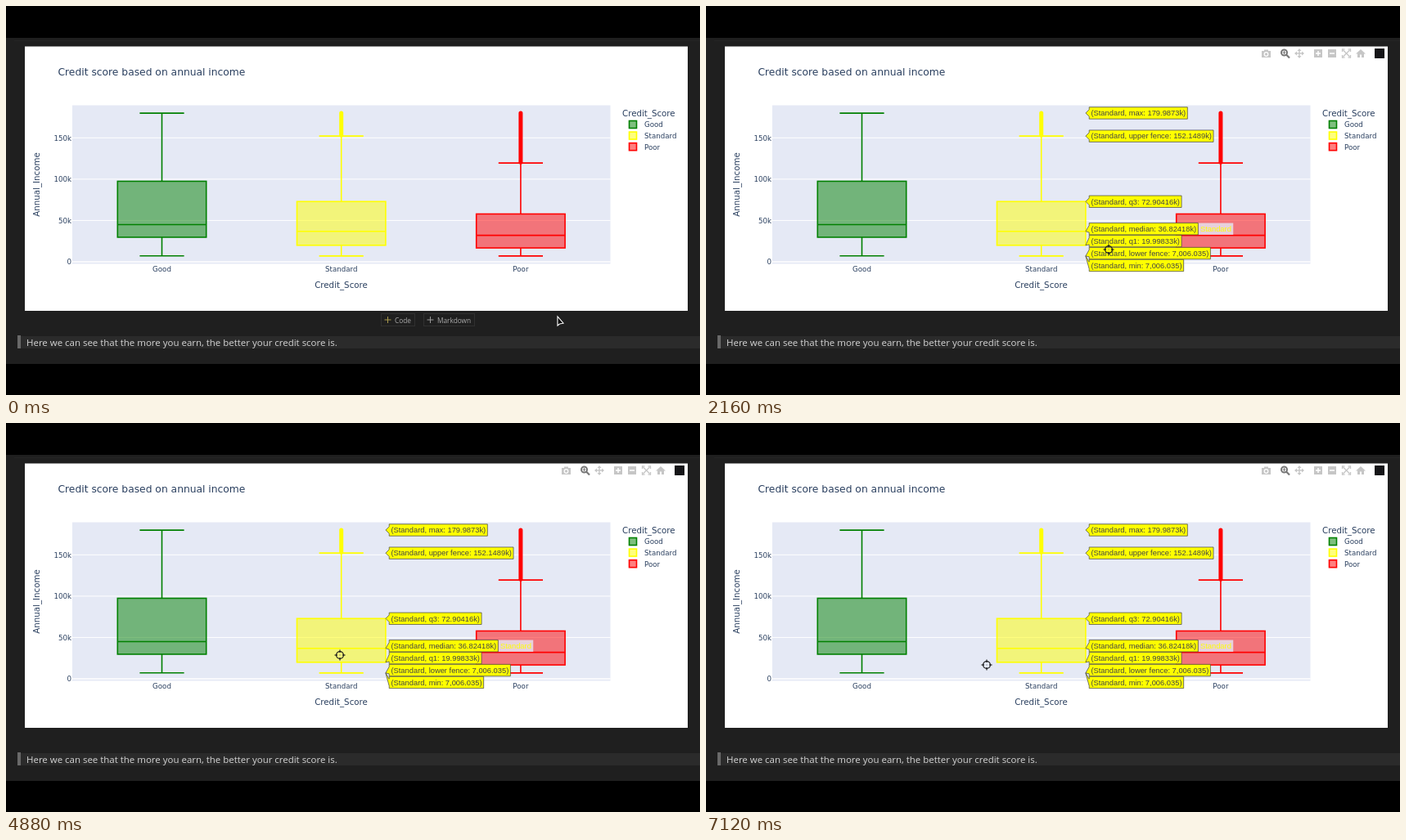
Write an HTML page with a canvas that moves like this. It is 848 by 476 pixels and loops after 7200 ms.

```html
<!DOCTYPE html>
<html lang="en">
<head>
<meta charset="utf-8">
<title>Credit score box plot</title>
<style>
  html, body { margin: 0; width: 100%; height: 100%; overflow: hidden; background: #000; }
  canvas { display: block; }
</style>
</head>
<body>
<canvas id="stage" width="848" height="476"></canvas>
<script>
const ctx = document.getElementById('stage').getContext('2d');
const LOOP = 7200, STEP = 80;
const INK = '#2a3f5f', PLOT = '#e5e9f5', ICON = '#c6c6c6';
const SANS = '"DejaVu Sans", sans-serif';
const UI = '"Open Sans", sans-serif';
const TITLE = '12.3px ' + SANS, AXIS = '10.25px ' + SANS, TICK = '8.68px ' + SANS;
const LABEL = '9.36px "Liberation Sans", sans-serif';

// Incomes in thousands, one per statistic
const STATS = ['max', 'upper fence', 'q3', 'median', 'q1', 'lower fence', 'min'];
const groups = [
  { name: 'Good', rgb: '0,128,0', contrast: '#fff',
    values: [179.8254, 179.8254, 97.45698, 44.92786, 29.70973, 7.18954, 7.18954] },
  { name: 'Standard', rgb: '255,255,0', contrast: '#444',
    values: [179.9873, 152.1489, 72.90416, 36.82418, 19.99833, 7.006035, 7.006035] },
  { name: 'Poor', rgb: '255,0,0', contrast: '#fff',
    values: [179.9873, 119.4912, 57.87795, 32.06486, 16.77091, 7.00593, 7.00593] },
];
groups.forEach((g, i) => {
  g.x = 190.5 + i * 219.2;
  g.line = `rgb(${g.rgb})`;
  g.fill = `rgba(${g.rgb},.5)`;
});

// Pointer stops: time, x, y
const path = [
  [0, 676, 385], [880, 636, 303], [2160, 492, 298], [3520, 200, 298], [3920, 200, 298],
  [4880, 408, 284], [5920, 632, 297], [6560, 526, 297], [7120, 343, 296], [LOOP, 325, 296],
];

const yOf = value => 313 - value * 1.0112;
const format = v => v < 10
  ? (v * 1000).toLocaleString('en', { maximumFractionDigits: 3 })
  : v + 'k';

function rect(x, y, w, h, color) {
  ctx.fillStyle = color;
  ctx.fillRect(x, y, w, h);
}

function frame(x, y, w, h, color, width) {
  ctx.strokeStyle = color;
  ctx.lineWidth = width;
  ctx.strokeRect(x, y, w, h);
}

function line(x1, y1, x2, y2, color, width) {
  ctx.strokeStyle = color;
  ctx.lineWidth = width;
  ctx.beginPath();
  ctx.moveTo(x1, y1);
  ctx.lineTo(x2, y2);
  ctx.stroke();
}

function plus(x, y, r, color, width) {
  line(x - r, y, x + r, y, color, width);
  line(x, y - r, x, y + r, color, width);
}

function ring(x, y, r, color, width) {
  ctx.strokeStyle = color;
  ctx.lineWidth = width;
  ctx.beginPath();
  ctx.arc(x, y, r, 0, 2 * Math.PI);
  ctx.stroke();
}

function polygon(points, color) {
  ctx.fillStyle = color;
  ctx.beginPath();
  points.forEach(p => ctx.lineTo(...p));
  ctx.closePath();
  ctx.fill();
}

function text(str, x, y, font, color, align = 'left') {
  ctx.font = font;
  ctx.fillStyle = color;
  ctx.textAlign = align;
  ctx.fillText(str, x, y);
}

// Draws the same part four times, a quarter turn apart
function fourWays(x, y, part) {
  for (let i = 0; i < 4; i++) {
    ctx.save();
    ctx.translate(x, y);
    ctx.rotate(i * Math.PI / 2);
    part();
    ctx.restore();
  }
}

function pointerAt(t) {
  const i = path.findIndex(p => p[0] > t);
  const [t0, x0, y0] = path[i - 1], [t1, x1, y1] = path[i];
  const k = (t - t0) / (t1 - t0);
  return { x: x0 + (x1 - x0) * k, y: y0 + (y1 - y0) * k };
}

// Pushes crowded positions apart, keeping the centre of each crowd
function spread(positions, gap) {
  const crowds = [];
  positions.forEach((y, i) => {
    const crowd = { sum: y - i * gap, n: 1 };
    while (crowds.length && crowds.at(-1).sum / crowds.at(-1).n > crowd.sum / crowd.n) {
      const previous = crowds.pop();
      crowd.sum += previous.sum;
      crowd.n += previous.n;
    }
    crowds.push(crowd);
  });
  return crowds.flatMap(c => Array(c.n).fill(c.sum / c.n)).map((y, i) => y + i * gap);
}

function drawNotebook() {
  rect(0, 0, 848, 476, '#000');
  rect(0, 39, 848, 399, '#1f1f1f');
  rect(10, 42, 838, 1, '#242424');
  rect(14, 404, 834, 15, '#2b2b2b');
  rect(14, 403, 4, 16, '#686868');
  text('Here we can see that the more you earn, the better your credit score is.',
       25, 416, '11.47px ' + UI, '#d4d4d4');
}

function drawCellButton(x, width, name, color) {
  frame(x + .5, 376.5, width, 15, '#303030', 1);
  plus(x + 8.5, 384, 4, color, 1);
  text(name, x + 17, 388, '8.3px ' + UI, '#aaa');
}

function drawBox({ x, line: color, fill, values }) {
  const [max, high, q3, median, q1, low] = values.map(yOf);
  const half = 54.2, cap = half / 2, width = 1.6;
  rect(x - half, q3, half * 2, q1 - q3, fill);
  frame(x - half, q3, half * 2, q1 - q3, color, width);
  line(x - half, median, x + half, median, color, width);
  for (const [edge, fence] of [[q3, high], [q1, low]]) {
    line(x, edge, x, fence, color, width);
    line(x - cap, fence, x + cap, fence, color, width);
  }
  if (max < high) {
    ctx.lineCap = 'round';
    line(x, max, x, high - 1, color, 5);
    ctx.lineCap = 'butt';
  }
}

function drawChart() {
  rect(23, 49.5, 810, 323.5, '#fff');
  rect(81, 121.5, 657.5, 194, PLOT);
  for (let v = 0; v <= 150; v += 50) {
    line(81, yOf(v), 738.5, yOf(v), '#fff', v ? 1 : 1.6);
    text(v ? v + 'k' : '0', 80, yOf(v) + 3.2, TICK, INK, 'right');
  }
  text('Credit score based on annual income', 63.5, 85, TITLE, INK);
  text('Credit_Score', 409.5, 344.5, AXIS, INK, 'center');
  text('Credit_Score', 753, 134.5, AXIS, INK);
  ctx.save();
  ctx.translate(41, 218.5);
  ctx.rotate(-Math.PI / 2);
  text('Annual_Income', 0, 0, AXIS, INK, 'center');
  ctx.restore();

  groups.forEach((g, i) => {
    const y = 145 + i * 13.6;
    drawBox(g);
    text(g.name, g.x, 325, TICK, INK, 'center');
    rect(761.5, y - 4.5, 9, 9, g.fill);
    frame(761.5, y - 4.5, 9, 9, g.line, 1.6);
    text(g.name, 780, y + 3.3, TICK, INK);
  });
}

function drawModebar() {
  const y = 58;
  // camera
  rect(679, y - 3, 11, 8, ICON);
  rect(682, y - 4.5, 5, 2, ICON);
  ring(684.5, y + 1, 2.3, '#fff', 1.2);
  // magnifier
  ring(706.5, y - 1, 3.5, '#777', 2);
  line(709, y + 1.5, 713, y + 5.5, '#777', 2.2);
  plus(706.5, y - 1, 2, '#777', 1);
  // pan
  plus(725, y, 5, ICON, 1.4);
  fourWays(725, y, () => polygon([[6, 0], [3, -2.5], [3, 2.5]], ICON));
  // zoom in, zoom out
  rect(743, y - 5, 10, 10, ICON);
  plus(748, y, 3, '#fff', 1.5);
  rect(760, y - 5, 10, 10, ICON);
  line(762, y, 768, y, '#fff', 1.5);
  // autoscale
  fourWays(782.5, y, () => {
    line(0, 0, 4, 4, ICON, 1.3);
    line(2, 5, 5.5, 5, ICON, 1.3);
    line(5, 2, 5, 5.5, ICON, 1.3);
  });
  // home
  polygon([[794, y + .5], [800, y - 5], [806, y + .5]], ICON);
  rect(796, y, 8, 5, ICON);
  rect(799, y + 1.5, 2, 3.5, '#fff');
  rect(817, y - 6, 12, 12, '#151518');
}

function drawHover({ name, x, line: color, contrast, values }) {
  const tip = x + 54.2, left = tip + 4.3, half = 7.2, notch = 4.3;
  const anchors = values.map(yOf);
  spread(anchors, 14.9).forEach((y, i) => {
    const label = `(${name}, ${STATS[i]}: ${format(values[i])})`;
    ctx.font = LABEL;
    const right = left + ctx.measureText(label).width + 4.3;
    if (STATS[i] === 'median') {
      rect(right, y - half, ctx.measureText(name).width + 5, half * 2, 'rgba(229,233,245,.8)');
      text(name, right + 2.6, y + 3.3, LABEL, color);
    }
    polygon([[tip, anchors[i]], [left, y + notch], [left, y + half], [right, y + half],
             [right, y - half], [left, y - half], [left, y - notch]], color);
    ctx.strokeStyle = contrast;
    ctx.lineWidth = .72;
    ctx.stroke();
    text(label, left + 2.2, y + 3.3, LABEL, contrast);
  });
}

function drawCrosshair(x, y) {
  ring(x, y, 4.4, '#1a1a1a', 1.2);
  fourWays(x, y, () => line(3, 0, 6.5, 0, '#1a1a1a', 1.2));
  rect(x - .5, y - .5, 1, 1, '#666');
}

function drawArrow(x, y) {
  polygon([[x - 2, y - 5], [x - 2, y + 6], [x + .5, y + 4], [x + 5, y + 3.2]], '#000');
  ctx.strokeStyle = '#fff';
  ctx.lineWidth = 1.1;
  ctx.stroke();
}

function draw(t) {
  const { x, y } = pointerAt(t);
  drawNotebook();
  drawChart();
  if (y > 373) {
    drawCellButton(458, 41, 'Code', '#a99a4e');
    drawCellButton(510, 62, 'Markdown', '#999');
  }
  ctx.globalAlpha = Math.min(1, Math.max(0, (t - 130) / 300));
  drawModebar();
  ctx.globalAlpha = 1;
  if (y < 315) {
    const distance = g => Math.abs(g.x - x);
    drawHover(groups.reduce((a, b) => distance(b) < distance(a) ? b : a));
    drawCrosshair(x, y);
  } else {
    drawArrow(x, y);
  }
}

const start = performance.now();
function tick() {
  const t = Math.max(0, performance.now() - start) % LOOP;
  draw(Math.floor(t / STEP) * STEP);
  requestAnimationFrame(tick);
}
tick();
</script>
</body>
</html>
```
